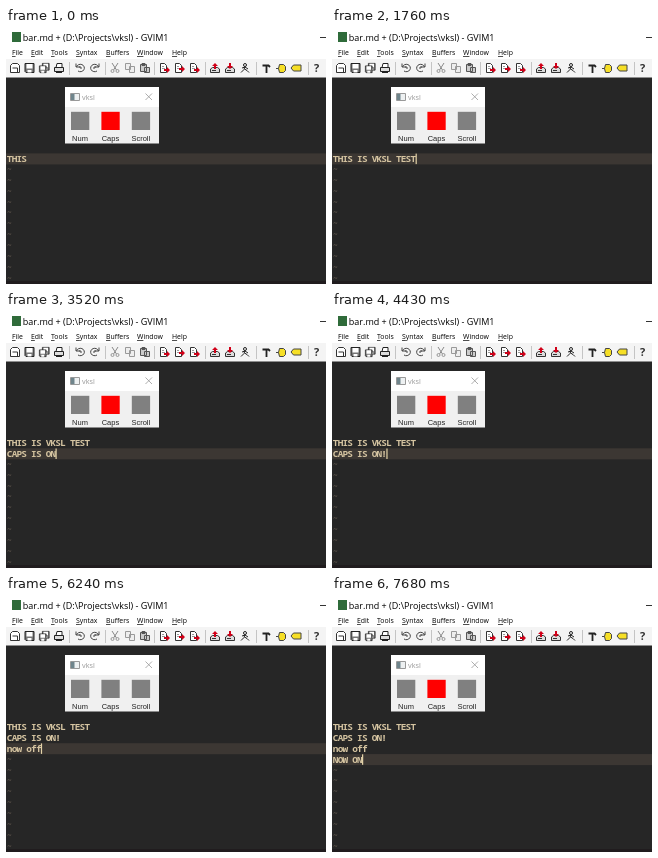
An HTML page that plays this animation: 320x256 px, repeating every 8000 ms.

```html
<!DOCTYPE html>
<html lang="en">
<head>
<meta charset="utf-8">
<title>Lock key indicator</title>
<style>
html, body { margin: 0; width: 100%; height: 100%; overflow: hidden; background: #262626; }
svg { display: block; width: 320px; height: 256px; }
.ui { font-family: "Open Sans", sans-serif; }
.label { font: 7.5px "Liberation Sans", Arial, sans-serif; text-anchor: middle; fill: #222; }
.code { font: 600 9.4px "Noto Sans Mono", monospace; letter-spacing: -.77px; white-space: pre; fill: #d5c4a1; }
.tilde { font: 600 8px "Noto Sans Mono", monospace; fill: #5a524a; }
.line { fill: none; stroke: #222; }
.off { fill: #eee; stroke: #999; }
</style>
</head>
<body>
<svg viewBox="0 0 320 256">
  <defs>
    <path id="open" d="M.5 9.500v-7l2-2h5l2 2v7zM2.500 5h5v4" fill="#fff" stroke="#333"/>
    <g id="disk"><path d="M.5.5h9v9h-8l-1-1z" fill="#777" stroke="#222"/><path d="M2 1h6v4.500h-6zM3 7h4v2.500h-4z" fill="#fff"/></g>
    <g id="print"><path d="M2 4.500l1-4h5L8 4.500z" fill="#fff" stroke="#222"/><path d="M.5 4.500h9v4h-9z" fill="#ddd" stroke="#222"/><path d="M2 9.500h6" class="line"/></g>
    <path id="turn" d="M1 .5v3.500h4M1.500 4A4 3.700 0 1 1 3 8M4 4h2v2" fill="none" stroke="#444"/>
    <g id="page"><path d="M1.500.5h4l2 2v7h-6z" fill="#fff" stroke="#333"/><path d="M3 3.500h2M3 5.500h3" stroke="#999"/></g>
    <path id="arrow" d="M0 2h3V0l3 3-3 3V4H0z" fill="#d00018"/>
    <path id="drive" d="M.5 6l2-1.500h5l2 1.500v3.500h-9zM2 7.500h4" fill="#ddd" stroke="#333"/>
  </defs>

  <rect width="320" height="256" fill="#262626"/>
  <rect y="253" width="320" height="3" fill="#201c1e"/>
  <g id="tildes"></g>
  <rect id="band" width="320" height="11" fill="#3c3733"/>
  <g id="rows"></g>
  <rect id="caret" width="1.2" height="10.500" fill="#e4d3a8"/>

  <rect width="320" height="32" fill="#fff"/>
  <rect x="6" y="4" width="9" height="10" fill="#2f6b3a"/>
  <text class="ui" x="16.800" y="12.500" font-size="9">bar.md + (D:\Projects\vksl) - GVIM1</text>
  <path d="M314 9.500h6" stroke="#333"/>
  <g id="menu" class="ui" font-size="6.9"></g>

  <rect y="31" width="320" height="18.500" fill="#f4f4f4"/>
  <path d="M63.500 34v13M99.500 34v13M148.500 34v13M199.500 34v13M250.500 34v13M302.500 34v13" stroke="#c4c4c4"/>
  <g transform="translate(0 35)">
    <use href="#open" x="4"/>
    <use href="#disk" x="18.500"/>
    <use href="#disk" transform="translate(36 0) scale(.75)"/>
    <use href="#disk" transform="translate(33 2.500) scale(.75)"/>
    <use href="#print" x="48"/>
    <use href="#turn" x="69"/>
    <use href="#turn" transform="translate(94 0) scale(-1 1)"/>
    <path d="M106 0l4.500 7M112 0l-4.500 7" stroke="#888"/>
    <circle cx="106.500" cy="8" r="1.500" class="off"/><circle cx="111.500" cy="8" r="1.500" class="off"/>
    <path d="M119.500.5h5v6h-5zM123.500 3.500h5v6h-5z" class="off"/>
    <path d="M134.500 1.500h6v7h-6zM138.500 4.500h5v5h-5zM136 .5h3v2h-3z" fill="#ccc" stroke="#555"/>
    <use href="#page" x="153"/><use href="#arrow" x="158" y="4"/>
    <use href="#page" x="168"/><use href="#arrow" x="173" y="3"/>
    <use href="#page" x="183"/><use href="#arrow" x="188" y="4"/>
    <use href="#drive" x="204"/><use href="#arrow" transform="translate(206 6) rotate(-90)"/>
    <use href="#drive" x="219"/><use href="#arrow" transform="translate(227 0) rotate(90)"/>
    <circle cx="239" cy="2" r="1.500" class="line"/>
    <path d="M239 3.500l-1 3-3 3M236 5l3-1 3 2M238.500 6l2.500 1.500 2 2" class="line"/>
    <path d="M256.500 2.500h6l1.500 1.500M260.500 2v8" class="line" stroke-width="1.800"/>
    <path d="M270 5.500h2.500l1-4h4l2 2v4l-2 2h-4l-1-4" fill="#f6df26" stroke="#444"/>
    <path d="M285 5l2.500-3h7.500v6h-7.500z" fill="#f6df26" stroke="#444"/>
    <text class="ui" x="308" y="9" font-size="11" font-weight="700" fill="#333">?</text>
  </g>

  <rect x="59" y="59" width="94" height="56.500" fill="#f0f0f0"/>
  <rect x="59" y="59" width="94" height="20" fill="#fff"/>
  <path d="M64.500 65.500h9v7h-9z" fill="#eef1f2" stroke="#999"/>
  <path d="M65 66h3.500v6h-3.500z" fill="#6f858c"/>
  <text class="ui" x="76" y="72" font-size="7.3" fill="#999">vksl</text>
  <path d="M139.500 65.500l6.500 6.500m0-6.500l-6.500 6.500" stroke="#999" stroke-width=".8"/>
  <g id="leds"></g>
</svg>
<script>
const $ = id => document.getElementById(id);
const add = (parent, tag, attrs, text = '') => {
  const el = document.createElementNS('http://www.w3.org/2000/svg', tag);
  for (const k in attrs) el.setAttribute(k, attrs[k]);
  el.textContent = text;
  return $(parent).appendChild(el);
};

const LOOP = 8000, TOP = 125.4, PITCH = 10.9, ADVANCE = 4.87;
const script = 'THIS IS VKSL TEST\nCAPS IS ON!\nnow off\nNOW ON';
const already = 4;
// One time per character typed after the first word
const keyTimes = [
  110, 270, 380, 540, 700, 850, 910, 1280, 1330, 1490, 1550, 1650, 1760, 2030,
  2450, 2670, 2990, 3040, 3090, 3140, 3200, 3225, 3250, 3410, 4370, 4800,
  5280, 5390, 5550, 5810, 5920, 6080, 6240, 6450,
  6880, 6990, 7090, 7360, 7570, 7680];

const menu = { File: 6, Edit: 25, Tools: 45, Syntax: 70, Buffers: 100, Window: 131, Help: 166 };
for (const name in menu) {
  const item = add('menu', 'text', { x: menu[name], y: 27 });
  item.innerHTML = `<tspan text-decoration="underline">${name[0]}</tspan>${name.slice(1)}`;
}

const leds = ['Num', 'Caps', 'Scroll'].map((name, i) => {
  const x = 65 + i * 30.4;
  add('leds', 'text', { class: 'label', x: x + 9, y: 112.5 }, name);
  return add('leds', 'rect', { x, y: 83.8, width: 18.3, height: 18.2, fill: '#808080' });
});

const rowY = i => TOP + i * PITCH;
const rows = [0, 1, 2, 3].map(i => add('rows', 'text', { class: 'code', x: 0.8, y: rowY(i) + 8.4 }));
const tildes = Array.from({ length: 12 }, (_, i) =>
  add('tildes', 'text', { class: 'tilde', x: 1, y: rowY(i) + 7.5 }, '~'));

function draw() {
  const t = performance.now() % LOOP;
  const typed = already + keyTimes.filter(k => k <= t).length;
  const lines = script.slice(0, typed).split('\n');
  const last = lines.length - 1;
  rows.forEach((row, i) => row.textContent = lines[i] || '');
  tildes.forEach((el, i) => el.setAttribute('visibility', i > last ? 'visible' : 'hidden'));
  $('band').setAttribute('y', rowY(last));
  $('caret').setAttribute('x', 0.8 + lines[last].length * ADVANCE);
  $('caret').setAttribute('y', rowY(last) + .2);
  $('caret').setAttribute('visibility', t < 50 ? 'hidden' : 'visible');
  leds[1].setAttribute('fill', t >= 5070 && t < 6670 ? '#808080' : '#f00');
  requestAnimationFrame(draw);
}
draw();
</script>
</body>
</html>
```
